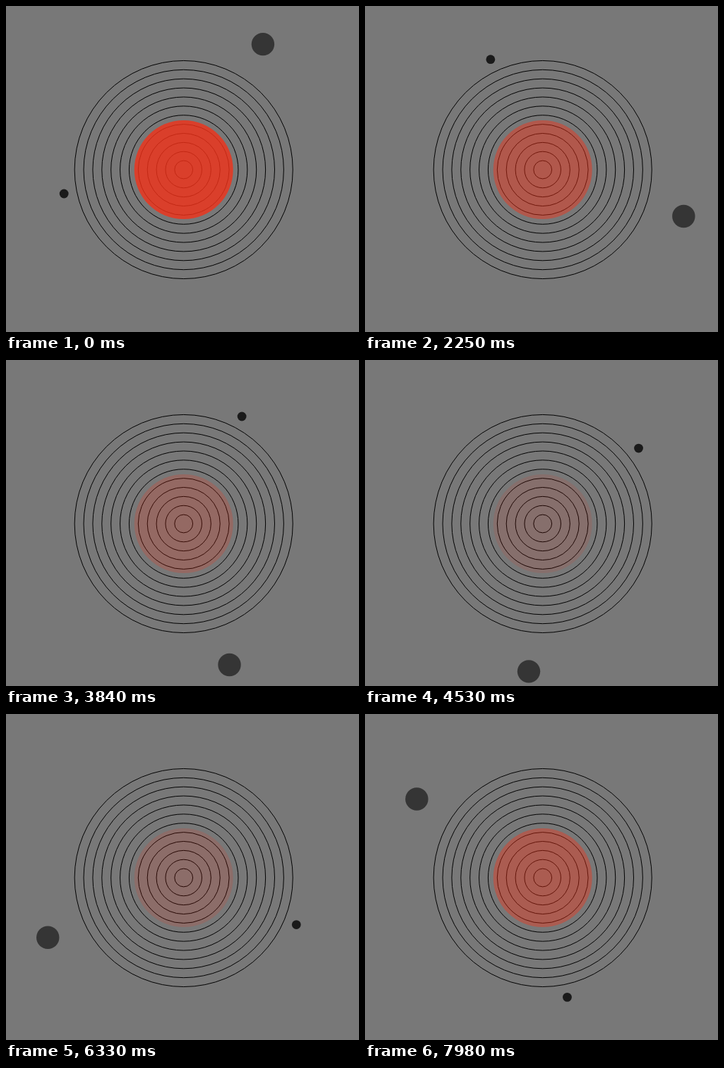
Recreate the animation shown at these times as an HTML page. Size 500x462 px, loop 8000 ms.

```html
<!DOCTYPE html>
<html lang="en">
<head>
<meta charset="utf-8">
<title>Orbits</title>
<style>
html, body { margin: 0; width: 100%; height: 100%; overflow: hidden; background: #787878; }
svg { display: block; width: 100%; height: 100%; }
</style>
</head>
<body>
<svg viewBox="0 0 500 462">
  <g transform="translate(251.7 232)">
    <g id="rings" fill="none" stroke="#000" stroke-width="1"></g>
    <circle id="sun" r="70" fill="#f43218"/>
    <circle id="planet" r="16.2" fill="#353535"/>
    <circle id="moon" r="6.4" fill="#1a1a1a"/>
  </g>
</svg>
<script>
const LOOP = 8000, STEP = 30;
const TURN = 10650; // ms for one full orbit
const FADE_END = 5300; // ms at which the sun is fully faded
const RING_COUNT = 12, RING_GAP = 12.88;
const $ = id => document.getElementById(id);
const sun = $('sun'), planet = $('planet'), moon = $('moon');

for (let i = 1; i <= RING_COUNT; i++) {
  const ring = document.createElementNS('http://www.w3.org/2000/svg', 'circle');
  ring.setAttribute('r', i * RING_GAP);
  $('rings').append(ring);
}

function orbit(dot, radius, startDeg, t) {
  const a = startDeg * Math.PI / 180 + t / TURN * 2 * Math.PI;
  dot.setAttribute('cx', radius * Math.cos(a));
  dot.setAttribute('cy', radius * Math.sin(a));
}

function draw(ms) {
  const t = Math.floor(ms % LOOP / STEP) * STEP;
  orbit(planet, 210.3, -57.75, t);
  orbit(moon, 172.9, 168.66, t);
  sun.setAttribute('opacity', 0.8 * Math.abs(t - FADE_END) / (TURN / 2));
}

const start = performance.now();
function tick() {
  draw(performance.now() - start);
  requestAnimationFrame(tick);
}
tick();
</script>
</body>
</html>
```
